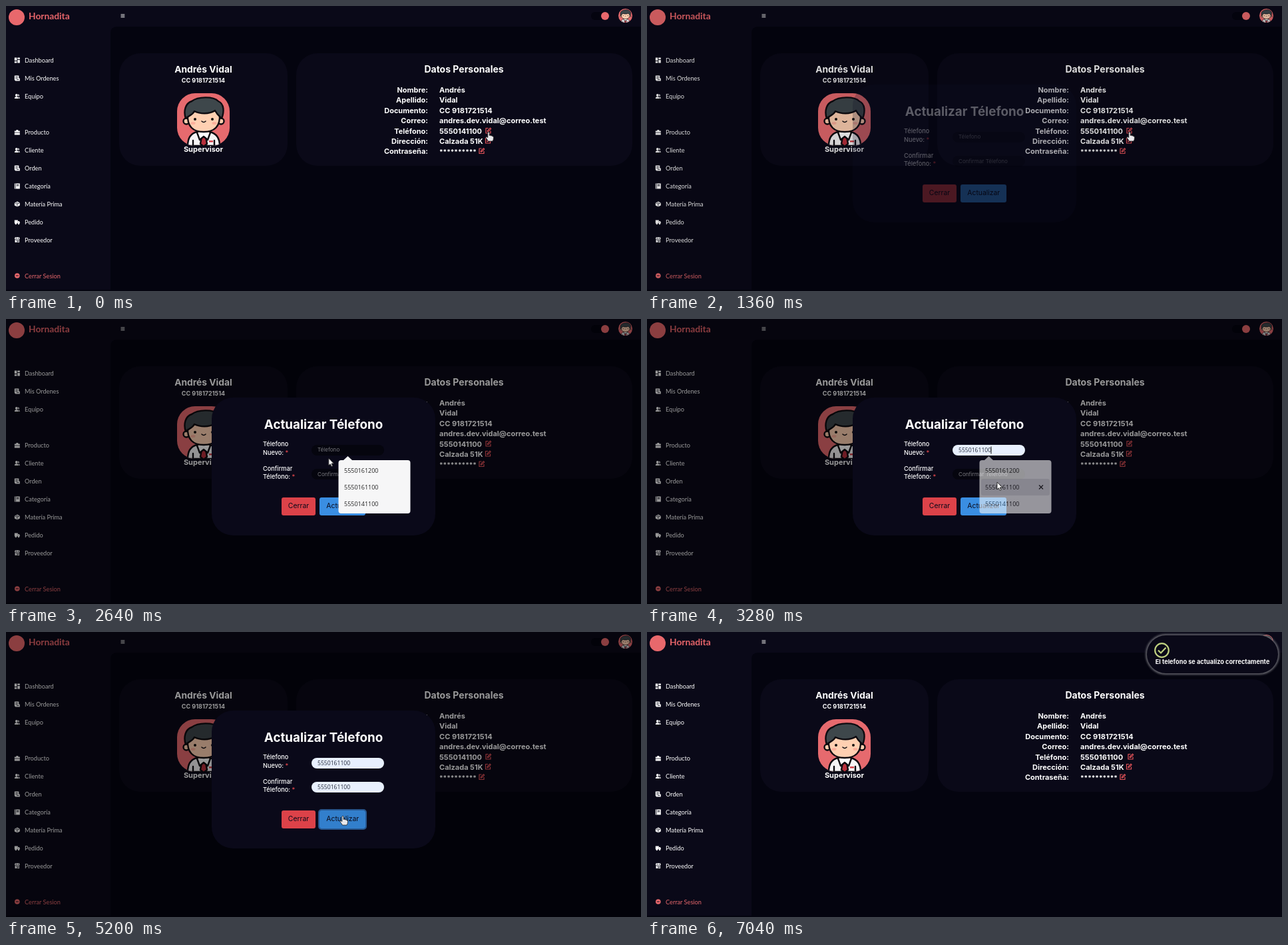
Write an HTML page that moves like this. It is 954x428 px and loops after 7.12 s.

```html
<!DOCTYPE html>
<html lang="es">
<head>
<meta charset="utf-8">
<title>Datos Personales</title>
<style>
  html, body { margin: 0; width: 100%; height: 100%; overflow: hidden; background: #04040f; }
  svg.stage { display: block; width: 954px; height: 428px; font-family: Inter, "Open Sans", sans-serif; fill: #fff; }
  .bold { font-weight: 700; }
  .mid { text-anchor: middle; }
  .end { text-anchor: end; }
  .nav { font: 9.2px Lato, sans-serif; }
  .brand { font: 700 13.8px Lato, sans-serif; fill: #e8656a; }
  .row { font-size: 11px; font-weight: 700; }
  .label { font-size: 9.2px; font-weight: 500; }
  .hint { font-size: 8.1px; fill: #77777d; }
  .button { font-size: 10.4px; fill: #0a0a1a; }
  .typed { font: 8.6px "Open Sans", sans-serif; fill: #222938; }
  .option { font: 9px "Open Sans", sans-serif; fill: #222; }
  .accent { fill: #e8686c; }
  .must { fill: #e5484d; }

  .anim { animation: 7120ms linear infinite; }
  .cut { animation: 7120ms step-end infinite; opacity: 0; }

  .modal { animation-name: modal; }
  @keyframes modal { 0%, 17.98% { opacity: 0 } 21.35%, 76.4% { opacity: 1 } 78.65%, 100% { opacity: 0 } }

  .list1 { animation-name: list1; }
  @keyframes list1 { 0%, 32.57% { opacity: 0 } 32.58%, 44.94% { opacity: 1 } 47.75%, 100% { opacity: 0 } }
  .list2 { animation-name: list2; }
  @keyframes list2 { 0%, 52.8% { opacity: 0 } 52.81%, 60.11% { opacity: 1 } 62.92%, 100% { opacity: 0 } }

  .fill1 { animation-name: fill1; }
  @keyframes fill1 { 0% { opacity: 0 } 40.45%, 100% { opacity: 1 } }
  .fill2 { animation-name: fill2; }
  @keyframes fill2 { 0% { opacity: 0 } 57.3%, 100% { opacity: 1 } }
  .caret1 { animation-name: caret1; }
  @keyframes caret1 { 0% { opacity: 0 } 40.45% { opacity: 1 } 51.69%, 100% { opacity: 0 } }
  .caret2 { animation-name: caret2; }
  @keyframes caret2 { 0% { opacity: 0 } 57.3% { opacity: 1 } 71.9%, 100% { opacity: 0 } }

  .hover { animation-name: hover; }
  @keyframes hover { 0% { opacity: 0 } 66.29%, 100% { opacity: 1 } }
  .focus { animation-name: focus; }
  @keyframes focus { 0% { opacity: 0 } 71.9%, 100% { opacity: 1 } }

  .before { animation-name: before; }
  @keyframes before { 0% { opacity: 1 } 78.1%, 100% { opacity: 0 } }
  .after { animation-name: after; }
  @keyframes after { 0% { opacity: 0 } 78.1%, 100% { opacity: 1 } }

  .toast { animation-name: toast; }
  @keyframes toast {
    0%, 77.53% { transform: translateX(215px); animation-timing-function: ease-out }
    81.46%, 100% { transform: none }
  }

  .cursor { animation-name: cursor; animation-timing-function: ease-in-out; }
  @keyframes cursor {
    0%, 20.22% { transform: translate(725px, 189px) }
    25.84%, 29.21% { transform: translate(461px, 196px) }
    31.46%, 34.83% { transform: translate(472px, 198px) }
    41.57%, 47.75% { transform: translate(526px, 245px) }
    51.69%, 53.93% { transform: translate(500px, 234px) }
    58.43%, 62.92% { transform: translate(516px, 262px) }
    68.54%, 100% { transform: translate(506px, 276px) }
  }
  .hand { animation-name: hand; }
  @keyframes hand { 0% { opacity: 1 } 20.8% { opacity: 0 } 66.3% { opacity: 1 } 76.4%, 100% { opacity: 0 } }
  .arrow { animation-name: arrow; }
  @keyframes arrow {
    0% { opacity: 0 } 20.8% { opacity: 1 } 24.7% { opacity: 0 } 36% { opacity: 1 }
    49.4% { opacity: 0 } 55.1% { opacity: 1 } 66.3%, 100% { opacity: 0 }
  }
  .beam { animation-name: beam; }
  @keyframes beam {
    0% { opacity: 0 } 24.7% { opacity: 1 } 36% { opacity: 0 } 49.4% { opacity: 1 } 55.1%, 100% { opacity: 0 }
  }
</style>
</head>
<body>
<svg class="stage" viewBox="0 0 954 428">
  <defs>
    <clipPath id="tile"><rect width="79" height="79" rx="27"/></clipPath>
    <clipPath id="disc"><circle cx="39.5" cy="39.5" r="39.5"/></clipPath>
    <filter id="glow" x="-10%" y="-30%" width="120%" height="160%"><feGaussianBlur stdDeviation="1.5"/></filter>
    <g id="boy" stroke="#0d0b10" stroke-width="2.4" stroke-linejoin="round" stroke-linecap="round">
      <rect width="79" height="79" fill="#e66a6e" stroke="none"/>
      <path d="M16 79C16 67 21 60 30 58H49C58 60 64 67 64 79Z" fill="#f6f4f5"/>
      <path d="M31 56V61L40 67L49 61V56Z" fill="#f7c09f"/>
      <path d="M37 65H43L45 76L40 80L35 76Z" fill="#b8303c"/>
      <path d="M30 59L34 70L40 65L46 70L50 59" fill="#fff"/>
      <path d="M24 79V71M56 79V71" fill="none"/>
      <rect x="48" y="71" width="6" height="2.5" fill="#d5444b" stroke="none"/>
      <circle cx="14" cy="42" r="4.500" fill="#ffcdae"/>
      <circle cx="66" cy="42" r="4.500" fill="#ffcdae"/>
      <path d="M16 32C15 50 24 58 40 58S65 50 64 32L55 20H25Z" fill="#ffd0b2"/>
      <path d="M13 38C9 26 13 15 22 12C31 5 54 4 62 12C71 16 71 28 67 38C64 35 60 32 57 26C48 32 34 31 26 27C23 33 18 33 13 38Z" fill="#3e474b"/>
      <g stroke="none">
        <circle cx="27" cy="39" r="2" fill="#15110f"/>
        <circle cx="53" cy="39" r="2" fill="#15110f"/>
        <ellipse cx="24" cy="45" rx="3.500" ry="2" fill="#fdb09c"/>
        <ellipse cx="56" cy="45" rx="3.500" ry="2" fill="#fdb09c"/>
      </g>
      <path d="M37 42Q40 45 43 42" fill="none" stroke-width="1.5"/>
    </g>
    <g id="edit" fill="none" stroke="#e5545a" stroke-width="1.2" stroke-linejoin="round">
      <path d="M4.5 1H1V8.500H8V5"/><path d="M3.300 6.200L3.700 4.500L7.500.700L8.700 1.900L5 5.700Z"/>
    </g>
    <g id="dash"><path d="M0 0H3.500V4.500H0ZM4.500 0H8V2.500H4.500ZM0 5.500H3.500V8H0ZM4.500 3.500H8V8H4.500Z"/></g>
    <g id="sheet"><path d="M0 0H6.500V4H8V8H1.500L0 6.500Z"/><path d="M1.500 2H5M1.500 4H5M3 6H6.500" stroke="#0a0918" stroke-width=".8"/></g>
    <g id="team"><circle cx="3" cy="2.500" r="1.900"/><path d="M0 7.500Q0 4.800 3 4.800T6 7.500ZM5.200 1Q7.500 1 7 3.500L5.500 4.400Q8 5 8 7.500H6.600Z"/></g>
    <g id="case"><path d="M0 2H2.500V.500H5.500V2H8V4.200H0ZM0 5H8V8H0Z"/></g>
    <g id="book"><path d="M0 0H8V8H0Z"/><path d="M1.500 0V8M3 2H6.500M3 3.500H6.500" stroke="#0a0918" stroke-width=".8"/></g>
    <g id="box"><path d="M4 0L8 2V6L4 8L0 6V2Z"/><path d="M0 2L4 4L8 2M4 4V8M2 1L6 3" fill="none" stroke="#0a0918" stroke-width=".7"/></g>
    <g id="truck"><path d="M0 1H5V6H0ZM5.300 2.500H7L8 4V6H5.300Z"/><circle cx="2" cy="6.500" r="1.200"/><circle cx="6.200" cy="6.500" r="1.200"/></g>
    <g id="shop"><path d="M1 0H7L8 3H0ZM.700 3.500H7.300V8H.700Z"/><path d="M2 5H4V8M5 5H6.300V6.500H5ZM2.500 0V3M5.500 0V3" fill="none" stroke="#0a0918" stroke-width=".7"/></g>
    <g id="exit"><circle class="accent" cx="4" cy="4" r="3.800"/><path d="M2 4H6" stroke="#0a0918"/></g>
  </defs>

  <!-- page -->
  <rect width="954" height="426" fill="#0a0918"/>
  <path d="M157 426V41Q157 31 167 31H954V426Z" fill="#04040f"/>
  <circle class="accent" cx="16" cy="17" r="12"/>
  <text class="brand" x="34" y="20">Hornadita</text>
  <path d="M172.500 12.800H178.300M172.500 14.800H178.300M172.500 16.800H178.300" stroke="#ddd"/>
  <rect x="879" y="9" width="27" height="12" rx="6" fill="#04040f"/>
  <circle class="accent" cx="900" cy="15" r="6"/>
  <g transform="translate(920 4) scale(.266)"><use href="#boy" clip-path="url(#disc)"/></g>
  <g id="menu" class="nav"></g>

  <rect x="170" y="71" width="253" height="169" rx="32" fill="#0a0918"/>
  <text class="bold mid" x="296.500" y="99.500" font-size="13.800">Andrés Vidal</text>
  <text class="bold mid" x="296.500" y="114.500" font-size="9">CC 9181721514</text>
  <g transform="translate(257 131)"><use href="#boy" clip-path="url(#tile)"/></g>
  <text class="row mid" x="296.500" y="219">Supervisor</text>

  <rect x="436" y="71" width="505" height="169" rx="32" fill="#0a0918"/>
  <text class="bold mid" x="688" y="99.800" font-size="14">Datos Personales</text>
  <g id="facts" class="row"></g>
  <text class="bold" x="651" y="222.500" font-size="10">**********</text>
  <g class="cut before"><text class="row" x="651" y="191.600">5550141100</text><use href="#edit" x="720" y="182.500"/></g>
  <g class="cut after"><text class="row" x="651" y="191.600">5550161100</text><use href="#edit" x="722" y="182.500"/></g>
  <use href="#edit" x="719.500" y="197.500"/>
  <use href="#edit" x="710" y="213"/>

  <!-- dialog -->
  <g class="anim modal">
    <rect width="954" height="428" fill="#000" fill-opacity=".4"/>
    <rect x="309" y="118" width="336" height="207" rx="32" fill="#0a0919"/>
    <text class="bold mid" x="477" y="165" font-size="18.800">Actualizar Télefono</text>
    <g class="label">
      <text x="386" y="191">Télefono</text>
      <text x="386" y="203.500">Nuevo: <tspan class="must">*</tspan></text>
      <text x="386" y="227.500">Confirmar</text>
      <text x="386" y="240.300">Télefono: <tspan class="must">*</tspan></text>
    </g>
    <rect x="459" y="189" width="109" height="16" rx="8" fill="#05050e"/>
    <rect x="459" y="225" width="109" height="16" rx="8" fill="#05050e"/>
    <text class="hint" x="468" y="199.300">Télefono</text>
    <text class="hint" x="468" y="235.800">Confirmar Télefono</text>
    <g class="cut fill1">
      <rect x="459" y="189" width="109" height="16" rx="8" fill="#e8f0fe"/>
      <text class="typed" x="468" y="199.500">5550161100</text>
    </g>
    <path class="cut caret1" d="M517 191.500V202.500" stroke="#111"/>
    <g class="cut fill2">
      <rect x="459" y="225" width="109" height="16" rx="8" fill="#e8f0fe"/>
      <text class="typed" x="468" y="236">5550161100</text>
    </g>
    <path class="cut caret2" d="M517 227.500V238.500" stroke="#111"/>
    <rect x="414" y="268" width="51" height="27" rx="3" fill="#dc4249"/>
    <rect x="471" y="268" width="69" height="27" rx="3" fill="#3a8ee2"/>
    <rect class="cut hover" x="471" y="268" width="69" height="27" rx="3" fill="#327fcc"/>
    <rect class="cut focus" x="470" y="267" width="71" height="29" rx="4" fill="none" stroke="#28578f" stroke-width="2"/>
    <text class="button mid" x="439.500" y="284.300">Cerrar</text>
    <text class="button mid" x="505.800" y="284.300">Actualizar</text>
    <g class="anim list1" id="list1"></g>
    <g class="anim list2" id="list2"></g>
  </g>

  <!-- notice -->
  <g class="anim toast">
    <rect x="750.500" y="4.500" width="198" height="58" rx="29" fill="#0a0918" stroke="#74747c" stroke-width="2.500" filter="url(#glow)"/>
    <rect x="751" y="5" width="197" height="57" rx="28.500" fill="#0a0918"/>
    <g fill="none" stroke="#bed07f" stroke-width="2.200"><circle cx="773.500" cy="27.500" r="10.300"/><path d="M768 27.500L772 31.500L779.500 23.500"/></g>
    <text class="bold mid" x="849.500" y="47.500" font-size="9.200">El telefono se actualizo correctamente</text>
  </g>

  <!-- pointer -->
  <g class="anim cursor" stroke-linejoin="round">
    <path class="cut hand" d="M-1.200 1Q0-.800 1.200 1V5.500Q3 4.500 3.500 6Q5.500 5 5.800 6.800Q7.600 6.500 7.500 8.500Q7.500 12 6 14H-.500Q-2 11.500-4 9Q-4.500 6.500-1.200 8.500Z" fill="#e9e9ec" stroke="#222" stroke-width=".8"/>
    <path class="cut arrow" d="M0 0V11L2.500 8.700L4.200 12.500L6 11.700L4.300 8H7.700Z" fill="#fff" stroke="#222" stroke-width=".9"/>
    <path class="cut beam" d="M-2.500-5Q0-5 0-3.500Q0-5 2.500-5M0-3.500V3.500M-2.500 5Q0 5 0 3.500Q0 5 2.500 5" fill="none" stroke="#cfcfd4"/>
  </g>
</svg>
<script>
  const put = (id, parts) => { document.getElementById(id).innerHTML = parts.join(''); };

  const menu = [
    [82, 'dash', 'Dashboard'], [109, 'sheet', 'Mis Ordenes'], [136, 'team', 'Equipo'],
    [190, 'case', 'Producto'], [217, 'team', 'Cliente'], [244, 'sheet', 'Orden'],
    [271, 'book', 'Categoría'], [298, 'box', 'Matería Prima'], [325, 'truck', 'Pedido'],
    [351.5, 'shop', 'Proveedor'], [405.5, 'exit', 'Cerrar Sesion']
  ];
  put('menu', menu.map(([y, icon, name]) =>
    `<use href="#${icon}" x="12.800" y="${y - 4.5}"/>
     <text x="28" y="${y + 3.4}" ${icon === 'exit' ? 'class="accent"' : ''}>${name}</text>`));

  const facts = [
    ['Nombre', 'Andrés'], ['Apellido', 'Vidal'], ['Documento', 'CC 9181721514'],
    ['Correo', 'andres.dev.vidal@correo.test'], ['Teléfono', ''],
    ['Dirección', 'Calzada 51K'], ['Contraseña', '']
  ];
  put('facts', facts.map(([name, value], i) => {
    const y = 130 + i * 15.4;
    return `<text class="end" x="634" y="${y}">${name}:</text><text x="651" y="${y}">${value}</text>`;
  }));

  // Suggestion popup: hovered row gets a highlight and a close mark.
  function suggest(id, top, numbers, active, hoverClass) {
    const rowY = i => top + 15.5 + i * 25;
    const y = rowY(active);
    put(id, [
      `<path d="M507 ${top}L513.500 ${top - 6}L520 ${top}Z" fill="#f6f6f7"/>
       <rect x="499.500" y="${top}" width="108" height="${numbers.length * 25 + 5}" rx="4" fill="#f6f6f7"/>`,
      `<g class="cut ${hoverClass}"><rect x="502" y="${y - 12.5}" width="103" height="25" rx="3" fill="#dedee0"/>
       <path d="M589 ${y - 3}l6 6m0-6l-6 6" stroke="#222" stroke-width="1.200"/></g>`,
      ...numbers.map((n, i) => `<text class="option" x="508" y="${rowY(i) + 3.2}">${n}</text>`)
    ]);
  }
  suggest('list1', 212, ['5550161200', '5550161100', '5550141100'], 1, 'fill1');
  suggest('list2', 248, ['5550161100', '5550141100'], 0, 'fill2');
</script>
</body>
</html>
```
